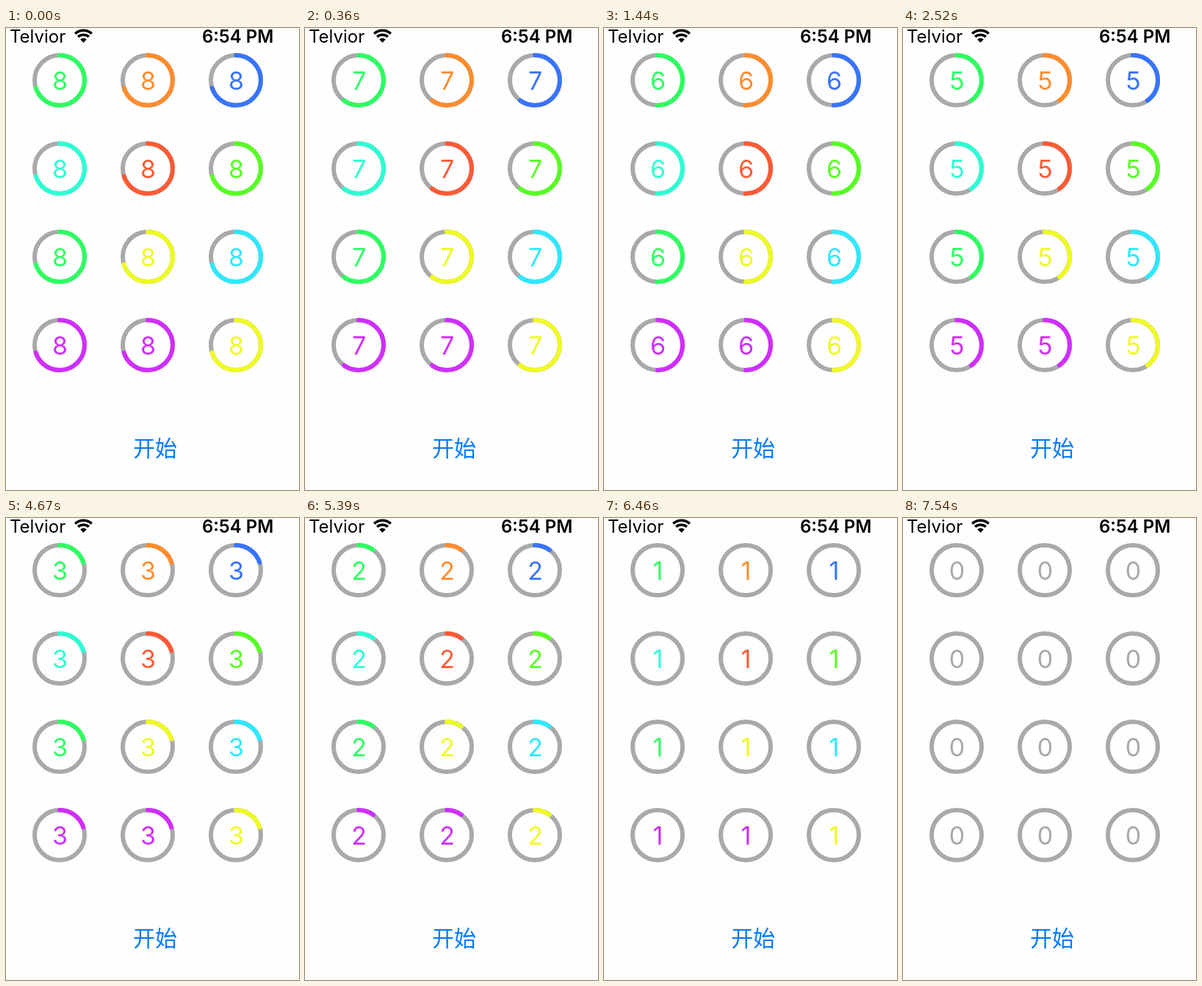
Recreate the animation shown at these times as an HTML page. Size 399 px wide and 628 px high, loop 8.62 s.

```html
<!DOCTYPE html>
<html lang="zh-CN">
<head>
<meta charset="utf-8">
<title>Countdown rings</title>
<style>
  html, body { margin: 0; width: 100%; height: 100%; overflow: hidden; background: #fefefe; }
  svg { display: block; }
  text { font-family: Inter, "Noto Sans CJK SC", "Noto Sans CJK", sans-serif; }
  .status { font-size: 24px; }
  .digit { font-size: 34px; text-anchor: middle; }
  .button { font: 30px "Noto Sans CJK SC", "Noto Sans CJK", sans-serif; text-anchor: middle; fill: #007aff; }
  circle { fill: none; stroke-width: 6; }
</style>
</head>
<body>
<svg id="stage" width="399" height="628" viewBox="0 0 399 628">
  <text class="status" x="5" y="20">Telvior</text>
  <g transform="translate(105.5 20)">
    <path d="M-11.3-12.4A16.8 16.8 0 0 1 11.3-12.4M-7.3-8A10.8 10.8 0 0 1 7.3-8" fill="none" stroke="#000" stroke-width="3.5"/>
    <path d="M0 0L-4.3-4.5A6.2 6.2 0 0 1 4.3-4.5Z"/>
  </g>
  <text class="status" x="267" y="20" font-weight="600" textLength="">6:54 PM</text>
  <g id="rings"></g>
  <text class="button" x="203" y="582">开始</text>
</svg>
<script>
  const LOOP = 8620;
  const GRAY = '#a9a9a9';
  const CHANGES = [360, 1440, 2520, 3600, 4670, 5390, 6460, 7540];
  const COLORS = [
    '#2eff62', '#ff8c2e', '#3874ff',
    '#2effd5', '#ff5a35', '#58ff24',
    '#2eff62', '#eefa24', '#2ee8ff',
    '#d02eff', '#d02eff', '#f0fa24'
  ];
  const group = document.getElementById('rings');

  function add(tag, attributes) {
    const node = document.createElementNS('http://www.w3.org/2000/svg', tag);
    for (const key in attributes) node.setAttribute(key, attributes[key]);
    return group.appendChild(node);
  }

  const rings = COLORS.map((color, i) => {
    const cx = 73 + 120 * (i % 3);
    const cy = 71 + 120 * Math.floor(i / 3);
    add('circle', { cx, cy, r: 34, stroke: GRAY });
    const arc = add('circle', {
      cx, cy, r: 34, stroke: color, pathLength: 10,
      'stroke-linecap': 'round', transform: `rotate(-90 ${cx} ${cy})`
    });
    const digit = add('text', { class: 'digit', x: cx + 0.5, y: cy + 12.5 });
    return { color, arc, digit };
  });

  let shown = -1;
  function show(count) {
    if (count === shown) return;
    shown = count;
    for (const { color, arc, digit } of rings) {
      // The arc covers one tenth less than the count and is gone at 1.
      arc.setAttribute('visibility', count > 1 ? 'visible' : 'hidden');
      arc.setAttribute('stroke-dasharray', `${Math.max(count - 1, 0)} 10`);
      digit.setAttribute('fill', count ? color : GRAY);
      digit.textContent = count;
    }
  }

  const start = performance.now();
  function frame() {
    const time = (performance.now() - start) % LOOP;
    show(8 - CHANGES.filter(change => time >= change).length);
    requestAnimationFrame(frame);
  }
  frame();
</script>
</body>
</html>
```
